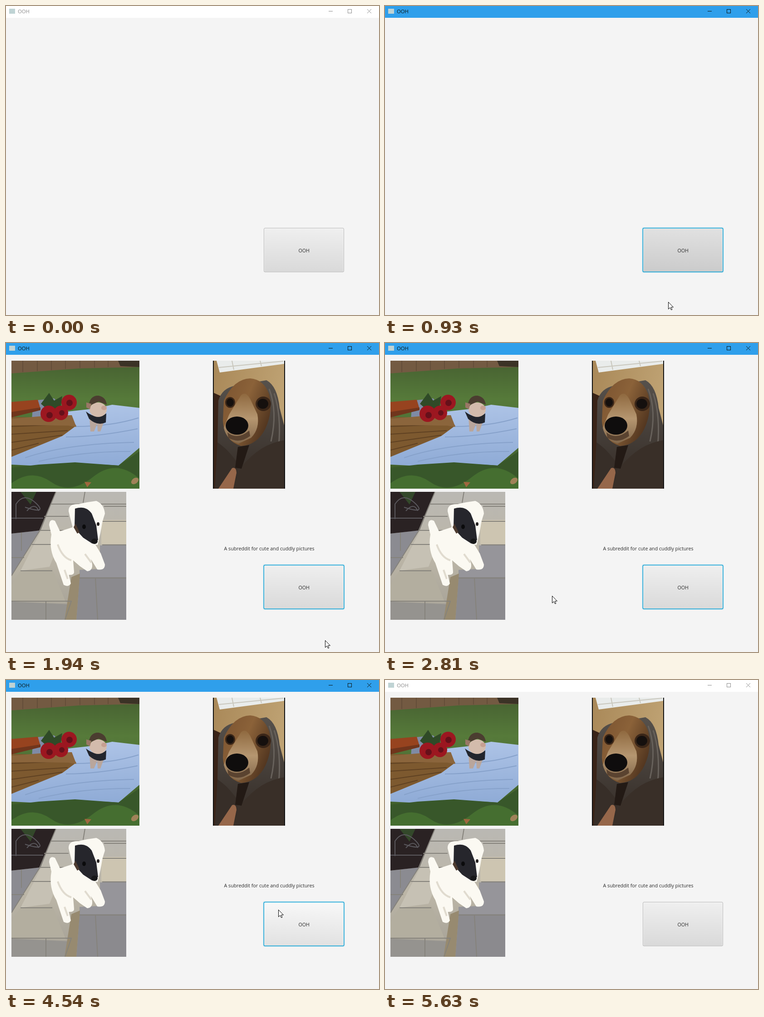
An HTML page that plays this animation: 822 by 681 pixels, repeating every 5.71 s.

```html
<!DOCTYPE html>
<html lang="en">
<head>
<meta charset="utf-8">
<title>OOH</title>
<style>
html, body { margin: 0; width: 100%; height: 100%; overflow: hidden; background: #f4f4f4; }
body > svg { display: block; width: 822px; height: 681px; }
text { font: 10.7px "Open Sans", "Noto Sans", sans-serif; fill: #2b2b2b; }

.bar, .controls, .press, .hover, .rest, .focus, .results, .cursor {
  animation: 5710ms step-end infinite;
}
.bar { animation-name: bar; }
.controls { animation-name: controls; }
.controls text { fill: currentColor; font-size: 11.3px; }
.press { animation-name: press; }
.hover { animation-name: hover; }
.rest { animation-name: rest; }
.focus { animation-name: focus; }
.results { animation-name: results; }
.cursor { animation-name: move, show; }

@keyframes bar {
  0%, 98.599% { fill: #fff; }
  6.305% { fill: #2f9feb; }
}
@keyframes controls {
  0%, 98.599% { color: #8c8c8c; }
  6.305% { color: #0c1614; }
}
@keyframes press {
  0%, 33.975% { opacity: 0; }
  6.305% { opacity: 1; }
}
@keyframes hover {
  0%, 98.599% { opacity: 0; }
  61.646% { opacity: 1; }
}
@keyframes rest {
  0%, 98.599% { opacity: 1; }
  6.305% { opacity: 0; }
}
@keyframes focus {
  0%, 98.599% { opacity: 0; }
  6.305% { opacity: 1; }
}
@keyframes results {
  0% { opacity: 0; }
  33.975%, 100% { opacity: 1; }
}
@keyframes show {
  0%, 95.972% { opacity: 0; }
  1.226% { opacity: 1; }
}
/* Each leg is sampled in a few jumps, with rests between the legs. */
@keyframes move {
  0% { transform: translate(714px, 690px); }
  1.226% { transform: translate(714px, 690px); animation-timing-function: steps(5, start); }
  7.57% { transform: translate(674px, 563px); }
  8.932% { transform: translate(674px, 563px); animation-timing-function: steps(3, start); }
  13.135% { transform: translate(604px, 656px); }
  16.287% { transform: translate(624px, 652px); }
  17.338% { transform: translate(661px, 638px); }
  20.14% { transform: translate(661px, 638px); animation-timing-function: steps(4, start); }
  25.744% { transform: translate(726px, 645px); animation-timing-function: steps(4, start); }
  31.173% { transform: translate(703px, 655px); }
  40.63% { transform: translate(703px, 655px); animation-timing-function: steps(6, start); }
  49.212% { transform: translate(368px, 557px); }
  50.438% { transform: translate(433px, 553px); }
  52.014% { transform: translate(433px, 553px); animation-timing-function: steps(4, start); }
  57.53% { transform: translate(520px, 480px); animation-timing-function: steps(4, start); }
  63.047% { transform: translate(580px, 523px); animation-timing-function: steps(4, start); }
  68.476% { transform: translate(503px, 467px); animation-timing-function: steps(4, start); }
  74.081% { transform: translate(551px, 466px); animation-timing-function: steps(5, start); }
  80.823% { transform: translate(600px, 506px); animation-timing-function: steps(2, start); }
  83.538% { transform: translate(630px, 547px); }
  85.114% { transform: translate(630px, 547px); animation-timing-function: steps(3, start); }
  89.16% { transform: translate(720px, 350px); animation-timing-function: steps(3, start); }
  93.205% { transform: translate(812px, 520px); animation-timing-function: steps(2, start); }
  95.9%, 100% { transform: translate(767px, 677px); }
}
</style>
</head>
<body>
<svg viewBox="0 0 822 681" xmlns="http://www.w3.org/2000/svg">
  <defs>
    <linearGradient id="normal" x2="0" y2="1"><stop stop-color="#efefef"/><stop offset="1" stop-color="#d9d9d9"/></linearGradient>
    <linearGradient id="down" x2="0" y2="1"><stop stop-color="#e1e1e1"/><stop offset="1" stop-color="#cbcbcb"/></linearGradient>
    <linearGradient id="over" x2="0" y2="1"><stop stop-color="#f8f8f8"/><stop offset="1" stop-color="#e1e1e1"/></linearGradient>
    <linearGradient id="grass" x2="0" y2="1"><stop stop-color="#466031"/><stop offset=".3" stop-color="#567a3a"/><stop offset=".75" stop-color="#456530"/><stop offset="1" stop-color="#35521f"/></linearGradient>
    <linearGradient id="cloth" x2="0" y2="1"><stop stop-color="#adc3e6"/><stop offset="1" stop-color="#8fabd6"/></linearGradient>
    <linearGradient id="wall" x2="1" y2=".4"><stop stop-color="#a98858"/><stop offset="1" stop-color="#c0a475"/></linearGradient>
    <linearGradient id="fur" x2="1" y2=".6"><stop stop-color="#7b5330"/><stop offset=".5" stop-color="#8b6239"/><stop offset="1" stop-color="#51351f"/></linearGradient>
    <linearGradient id="muzzle" x2="0" y2="1"><stop stop-color="#8f693f"/><stop offset=".5" stop-color="#b59670"/><stop offset="1" stop-color="#80664a"/></linearGradient>
    <linearGradient id="hood" x2="0" y2="1"><stop stop-color="#56514c"/><stop offset="1" stop-color="#332a24"/></linearGradient>
    <linearGradient id="stone" x2="0" y2="1"><stop stop-color="#bab8b3"/><stop offset=".5" stop-color="#bcb6a7"/><stop offset="1" stop-color="#a39f95"/></linearGradient>
  </defs>

  <rect width="822" height="681" fill="#f4f4f4"/>
  <rect class="bar" width="822" height="26"/>
  <rect x="7" y="6" width="13" height="11" fill="#bfd3d4"/>
  <g class="controls" fill="none" stroke="currentColor">
    <text x="26" y="16" stroke="none">OOH</text>
    <path d="M711 11.5h9M753.5 7.5h8v8h-8z" shape-rendering="crispEdges"/>
    <path d="M796 7l9 9M805 7l-9 9"/>
  </g>

  <g class="results">
    <!-- picnic -->
    <svg x="12" y="39" width="282" height="282">
      <rect width="282" height="282" fill="url(#grass)"/>
      <path d="M0 0H282V14L150 17 0 28Z" fill="#735a42"/>
      <path d="M235 0H282V14L240 12Z" fill="#3b3226"/>
      <path d="M25 0V25M57 0V23M88 0V21M119 0V18M151 0V16M183 0V15M213 0V14" stroke="#574330"/>
      <path d="M125 112L170 107 200 102 222 97 282 104V192L236 231 150 226 60 232 0 229V209L110 160Z" fill="url(#cloth)"/>
      <path d="M30 214Q120 183 270 180M60 222Q150 200 262 200M120 168Q190 168 278 150M140 145Q220 145 280 126" fill="none" stroke="#86a1ca" stroke-width="2"/>
      <path d="M48 88L94 83 120 110 70 143 45 130Z" fill="#7f8ba5"/>
      <path d="M0 124L125 126 143 143 112 166 0 212Z" fill="#7d592f"/>
      <path d="M0 145L128 140M0 162L124 154M0 180L112 164M0 197L60 182" stroke="#5f4122" stroke-width="2"/>
      <path d="M0 128L70 122 133 120 143 146 125 143 0 142Z" fill="#8b653c"/>
      <path d="M0 91L58 86 64 106 0 124Z" fill="#97431f"/>
      <path d="M0 113L64 103V109L0 125Z" fill="#70351c"/>
      <path d="M65 95L83 71 94 88 112 78 108 105 80 108Z" fill="#2f4a27"/>
      <g fill="#9c1720"><circle cx="82" cy="117" r="18"/><circle cx="109" cy="115" r="16"/><circle cx="127" cy="92" r="17"/></g>
      <g fill="#65101a"><circle cx="84" cy="120" r="7"/><circle cx="111" cy="115" r="6"/><circle cx="128" cy="93" r="7"/></g>
      <path d="M172 124H204L203 137 196 156H190L189 139 182 156H174Z" fill="#b9a69c"/>
      <path d="M164 112Q190 132 209 116L208 136Q190 145 171 128Z" fill="#22252d"/>
      <ellipse cx="191" cy="108" rx="19" ry="16" fill="#d3bbac"/>
      <path d="M170 100Q173 76 192 77 208 80 210 97L192 90Z" fill="#4b3d30"/>
      <path d="M165 92L176 95 173 107 165 103Z" fill="#9a7766"/>
      <ellipse cx="204" cy="104" rx="6" ry="5" fill="#c6a092"/>
      <path d="M0 236L60 229 140 224 236 231 282 200V282H0Z" fill="#38572a"/>
      <path d="M0 270Q45 237 87 267T180 256T282 260V282H0Z" fill="#456e30"/>
      <path d="M161 267L176 268 167 279Z" fill="#a0673f"/>
      <ellipse cx="272" cy="265" rx="9" ry="6" fill="#a08259" transform="rotate(-35 272 265)"/>
    </svg>

    <!-- hooded puppy -->
    <svg x="456" y="39" width="159" height="282">
      <rect width="159" height="282" fill="url(#wall)"/>
      <path d="M8 0H157V7L15 26Z" fill="#e9eceb"/>
      <path d="M13 15L155 1M42 0L46 20M104 0L107 12" stroke="#c9c7bd" stroke-width="2"/>
      <path d="M0 70L22 80 25 282H0Z" fill="#3a2418"/>
      <path d="M8 282L12 88Q20 60 50 55L118 43Q142 56 147 104L159 150V282Z" fill="url(#hood)"/>
      <path d="M124 62Q143 112 128 178M135 72Q151 120 145 188" fill="none" stroke="#67615b" stroke-width="3"/>
      <path d="M24 88Q46 40 82 39Q112 41 124 74Q133 111 116 149Q98 186 62 188Q24 176 22 132Z" fill="url(#fur)"/>
      <path d="M62 76Q72 66 82 84L98 118Q104 150 84 170L56 183Q30 174 24 148L36 118Z" fill="url(#muzzle)"/>
      <ellipse cx="38" cy="92" rx="11" ry="12" fill="#3a2618"/>
      <ellipse cx="111" cy="95" rx="17" ry="16" fill="#3a2618"/>
      <ellipse cx="38" cy="92" rx="8" ry="9" fill="#15100e"/>
      <ellipse cx="110" cy="95" rx="12" ry="11" fill="#15100e"/>
      <path d="M32 158Q54 176 80 154L82 166Q58 184 34 170Z" fill="#5a4330"/>
      <ellipse cx="53" cy="143" rx="25" ry="20" fill="#0f0d0d"/>
      <path d="M10 180Q35 196 57 230L48 282H4Z" fill="#372e28"/>
      <path d="M62 235Q105 182 159 175V282H43Z" fill="#392f28"/>
      <path d="M55 190L80 186 63 238 49 236Z" fill="#231a15"/>
      <path d="M12 282L42 237Q51 233 52 247L45 282Z" fill="#96674a"/>
      <path d="M1 0V282M158 0V282" stroke="#111" stroke-width="2"/>
    </svg>

    <!-- puppy on pavers -->
    <svg x="12" y="328" width="253" height="282">
      <rect width="253" height="282" fill="url(#stone)"/>
      <path d="M0 92L62 85 0 185Z" fill="#8b8b91"/>
      <path d="M65 86L116 84 84 165 20 174Z" fill="#c6c1b4"/>
      <path d="M20 174L90 170 120 244 0 240V205Z" fill="#b3ae9f"/>
      <path d="M0 242L130 248 118 282H0Z" fill="#95938f"/>
      <path d="M198 62H253V115H198Z" fill="#cdc5b1"/>
      <path d="M195 118H253V190H150V172L195 170Z" fill="#96959a"/>
      <path d="M150 188H253V282H143Z" fill="#8b8a8e"/>
      <path d="M132 188L151 180 143 282H117Z" fill="#978a70"/>
      <path d="M0 0H98L64 85 0 92Z" fill="#2a2223"/>
      <path d="M20 0H55L42 28Z" fill="#33482a"/>
      <g fill="none" stroke="#5b595e" stroke-width="2">
        <path d="M0 58H70M10 60V27Q28 0 54 25T30 34M60 42Q52 22 34 42"/>
      </g>
      <g fill="none" stroke="#85827b" stroke-width="2">
        <path d="M98 0L62 86 0 185M86 27H253M72 54H126M62 85H116M45 116H88M20 174H90M0 241H132L118 282"/>
        <path d="M162 0L158 24M204 32H253M200 65H253M200 117H253M150 190H253M185 190L190 282M0 145H28M22 90V130M76 241V282"/>
      </g>
      <g fill="#fbf9f2">
        <path d="M83 73Q84 58 96 64L107 87 138 77 178 105 197 136 206 160Q206 174 189 171L175 148Q184 173 167 175L151 164 136 151 138 176Q139 184 126 183L123 168 131 202Q126 211 115 205L99 157Q82 130 88 94Z"/>
        <path d="M126 43Q125 26 148 27L167 23 187 20Q204 27 206 48L201 64 196 91 190 117 167 114 138 91Z"/>
      </g>
      <path d="M102 116Q112 145 132 151M162 137L176 156M117 172L124 192" fill="none" stroke="#e0dbcf" stroke-width="4"/>
      <path d="M140 37Q164 29 177 48L187 74 191 106 178 114 158 101 139 80Z" fill="#26262c"/>
      <path d="M141 70L150 89 145 92 137 78Z" fill="#4d3b30"/>
      <ellipse cx="160" cy="77" rx="4" ry="5" fill="#0b0b0c"/>
      <ellipse cx="191" cy="71" rx="3" ry="4" fill="#242020"/>
      <ellipse cx="183" cy="109" rx="7" ry="6" fill="#171719"/>
    </svg>

    <text x="480.5" y="457">A subreddit for cute and cuddly pictures</text>
  </g>

  <g fill="none">
    <rect x="568" y="489.5" width="177" height="97" rx="2.5" fill="url(#normal)"/>
    <rect class="press" x="568" y="489.5" width="177" height="97" rx="2.5" fill="url(#down)"/>
    <rect class="hover" x="568" y="489.5" width="177" height="97" rx="2.5" fill="url(#over)"/>
    <rect x="569.5" y="490.5" width="174" height="95" rx="2" stroke="#fff" stroke-opacity=".5"/>
    <rect class="rest" x="568.5" y="489.5" width="176" height="96.5" rx="2.5" stroke="#b5b5b5"/>
    <g class="focus" stroke="#039ed3">
      <rect x="567.5" y="488.8" width="178" height="98" rx="3" stroke-width="3" stroke-opacity=".14"/>
      <rect x="568.3" y="489.6" width="176.5" height="96.5" rx="2.5" stroke-width="1.5" stroke-opacity=".9"/>
    </g>
  </g>
  <text x="656.7" y="543" text-anchor="middle">OOH</text>

  <g class="cursor">
    <path d="M.5 .5V16L4.2 12.7 6.4 17.5H8.4V16L6.6 11.8H11.4Z" fill="#fff" stroke="#000"/>
  </g>
</svg>
</body>
</html>
```
